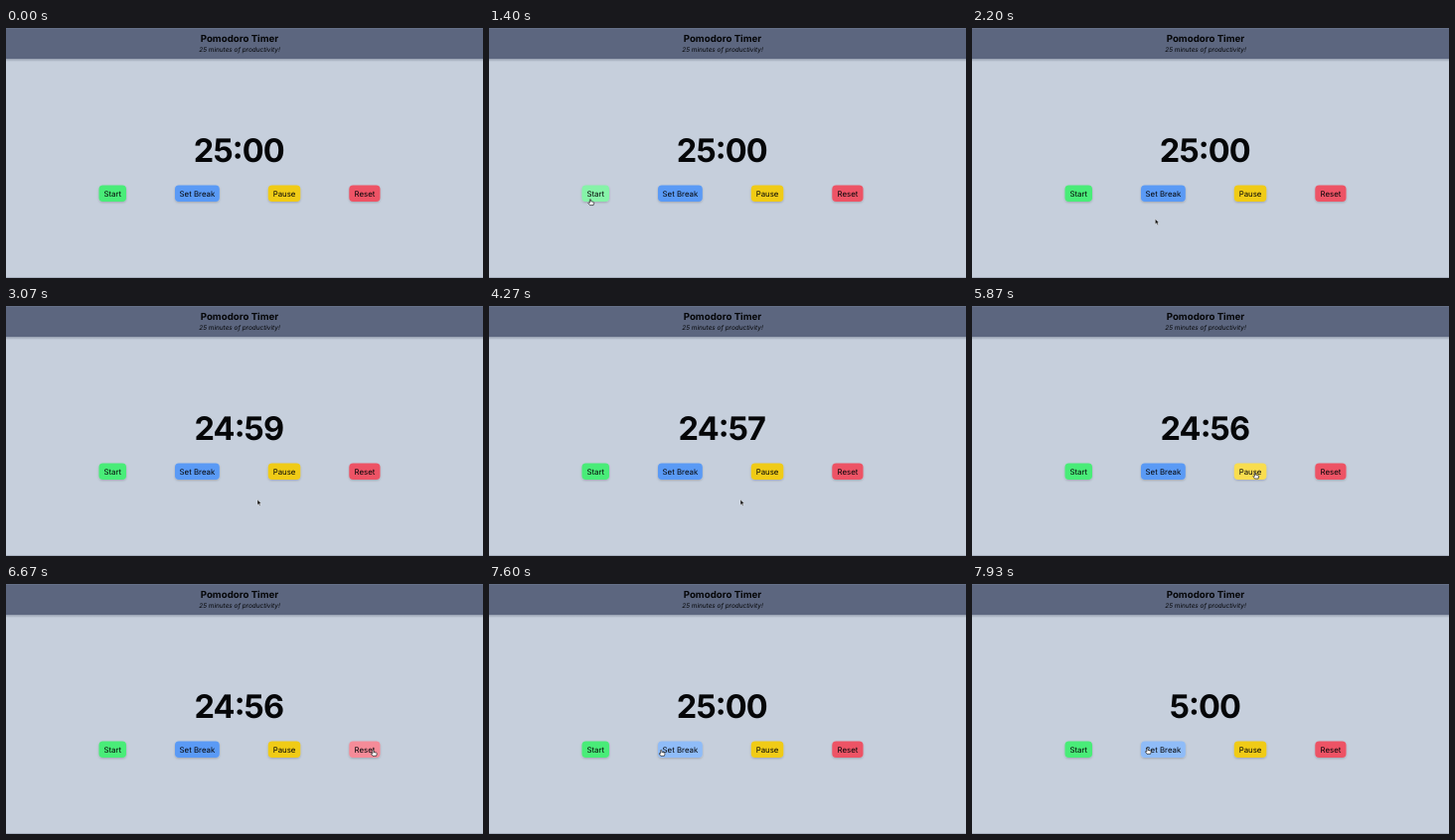
Write an HTML page that moves like this. It is 480 px wide and 252 px high and loops after 8 s.

```html
<!DOCTYPE html>
<html lang="en">
<head>
<meta charset="utf-8">
<title>Pomodoro Timer</title>
<style>
  html, body { margin: 0; width: 100%; height: 100%; overflow: hidden; background: #c6cfdc; }
  svg { display: block; width: 100vw; height: 100vh; }
  text {
    font-family: Inter, Roboto, sans-serif; text-anchor: middle; fill: #050608;
    text-rendering: geometricPrecision;
  }
  .title { font-size: 9.7px; font-weight: 700; }
  .sub { font-size: 6.45px; font-style: italic; }
  .clock { font-size: 32.5px; font-weight: 700; letter-spacing: -.9px; font-feature-settings: "calt" 1; }
  .label { font-size: 7.85px; }
</style>
</head>
<body>
<svg viewBox="0 0 480 252">
  <defs>
    <linearGradient id="fade" x2="0" y2="1">
      <stop offset="0" stop-color="#3c465c" stop-opacity=".35"/>
      <stop offset="1" stop-color="#3c465c" stop-opacity="0"/>
    </linearGradient>
    <filter id="soft" x="-20%" y="-30%" width="140%" height="180%">
      <feDropShadow dx="0" dy="1" stdDeviation="1.1" flood-color="#000" flood-opacity=".2"/>
    </filter>
  </defs>
  <rect width="480" height="252" fill="#c6cfdc"/>
  <rect y="251" width="480" height="1" fill="#aab3c2"/>
  <rect y="31" width="480" height="3" fill="url(#fade)"/>
  <rect width="480" height="31" fill="#5c667f"/>
  <rect width="480" height=".6" fill="#6d7890"/>
  <text class="title" x="235" y="13.8">Pomodoro Timer</text>
  <text class="sub" x="235" y="23.5">25 minutes of productivity!</text>
  <text class="clock" id="clock" x="234.3" y="135.1">25:00</text>
  <g id="buttons"></g>
  <g id="cursor">
    <path id="arrow" d="M0 0V5.2L1.3 4.1L2.2 6L3.1 5.6L2.3 3.8H3.8Z" fill="#111" stroke="#fff" stroke-width=".4"/>
    <path id="hand" d="M-.6 .3Q0-.3 .6 .3V2.2L3 2.7Q3.9 3 3.7 4L3.1 6H-.5L-2.2 3.7Q-2.1 2.7-.6 3.7Z"
      fill="#fff" stroke="#222" stroke-width=".7" stroke-linejoin="round"/>
  </g>
</svg>
<script>
const NS = 'http://www.w3.org/2000/svg';
const LOOP = 8000;
const LEFT = 93.5, TOP = 158.4, HEIGHT = 16.5, GAP = 49;
const $ = id => document.getElementById(id);

// click times
const STARTED = 1220, PAUSED = 5700, RESET = 6800, BREAK = 7800;

const buttons = [
  { label: 'Start', w: 27.5, color: '#4aec78', hover: '#86f3a8' },
  { label: 'Set Break', w: 44.8, color: '#5a9af5', hover: '#8fbcf8' },
  { label: 'Pause', w: 32.5, color: '#f0cb18', hover: '#f9dd50' },
  { label: 'Reset', w: 31.2, color: '#ed5365', hover: '#f58b98' }
];

// the pointer rests between moves
const entry = { at: 270, x: 218, y: 222 };
const moves = [
  { from: 270, to: 1070, x: 102, y: 172.6 },
  { from: 1400, to: 1670, x: 157, y: 187 },
  { from: 1930, to: 2530, x: 221, y: 200 },
  { from: 2670, to: 3070, x: 253, y: 195.3 },
  { from: 5000, to: 5270, x: 270.3, y: 180 },
  { from: 5270, to: 5730, x: 285, y: 168 },
  { from: 5870, to: 6270, x: 392, y: 169 },
  { from: 6270, to: 6470, x: 369.5, y: 167.3 },
  { from: 7270, to: 7600, x: 173.3, y: 167.3 },
  { from: 7600, to: 7930, x: 176.5, y: 165.3 }
];

function add(parent, tag, attrs) {
  const node = document.createElementNS(NS, tag);
  for (const key in attrs) node.setAttribute(key, attrs[key]);
  return parent.appendChild(node);
}

let nextX = LEFT;
for (const b of buttons) {
  b.x = nextX;
  nextX += b.w + GAP;
  b.rect = add($('buttons'), 'rect', {
    x: b.x, y: TOP, width: b.w, height: HEIGHT, rx: 4, filter: 'url(#soft)'
  });
  add($('buttons'), 'text', { class: 'label', x: b.x + b.w / 2, y: 169.5 }).textContent = b.label;
}

const clamp = v => Math.min(1, Math.max(0, v));
const ease = k => k * k * (3 - 2 * k);

function pointerAt(t) {
  let { x, y } = entry;
  for (const m of moves) {
    const k = ease(clamp((t - m.from) / (m.to - m.from)));
    x += (m.x - x) * k;
    y += (m.y - y) * k;
  }
  return { x, y };
}

function secondsLeft(t) {
  if (t >= BREAK) return 5 * 60;
  if (t >= RESET) return 25 * 60;
  const run = Math.max(0, Math.min(t, PAUSED) - STARTED);
  return 25 * 60 - Math.floor(run / 1000);
}

function clockText(s) {
  return Math.floor(s / 60) + ':' + String(s % 60).padStart(2, '0');
}

function render(t) {
  const shown = t >= entry.at;
  const { x, y } = pointerAt(t);
  let over = false;
  for (const b of buttons) {
    const hit = shown && x >= b.x && x <= b.x + b.w && y >= TOP && y <= TOP + HEIGHT;
    b.rect.setAttribute('fill', hit ? b.hover : b.color);
    over = over || hit;
  }
  $('clock').textContent = clockText(secondsLeft(t));
  $('cursor').style.display = shown ? '' : 'none';
  $('cursor').setAttribute('transform', `translate(${x} ${y})`);
  $('hand').style.display = over ? '' : 'none';
  $('arrow').style.display = over ? 'none' : '';
}

const start = performance.now();
function tick() {
  render((performance.now() - start) % LOOP);
  requestAnimationFrame(tick);
}
tick();
</script>
</body>
</html>
```
